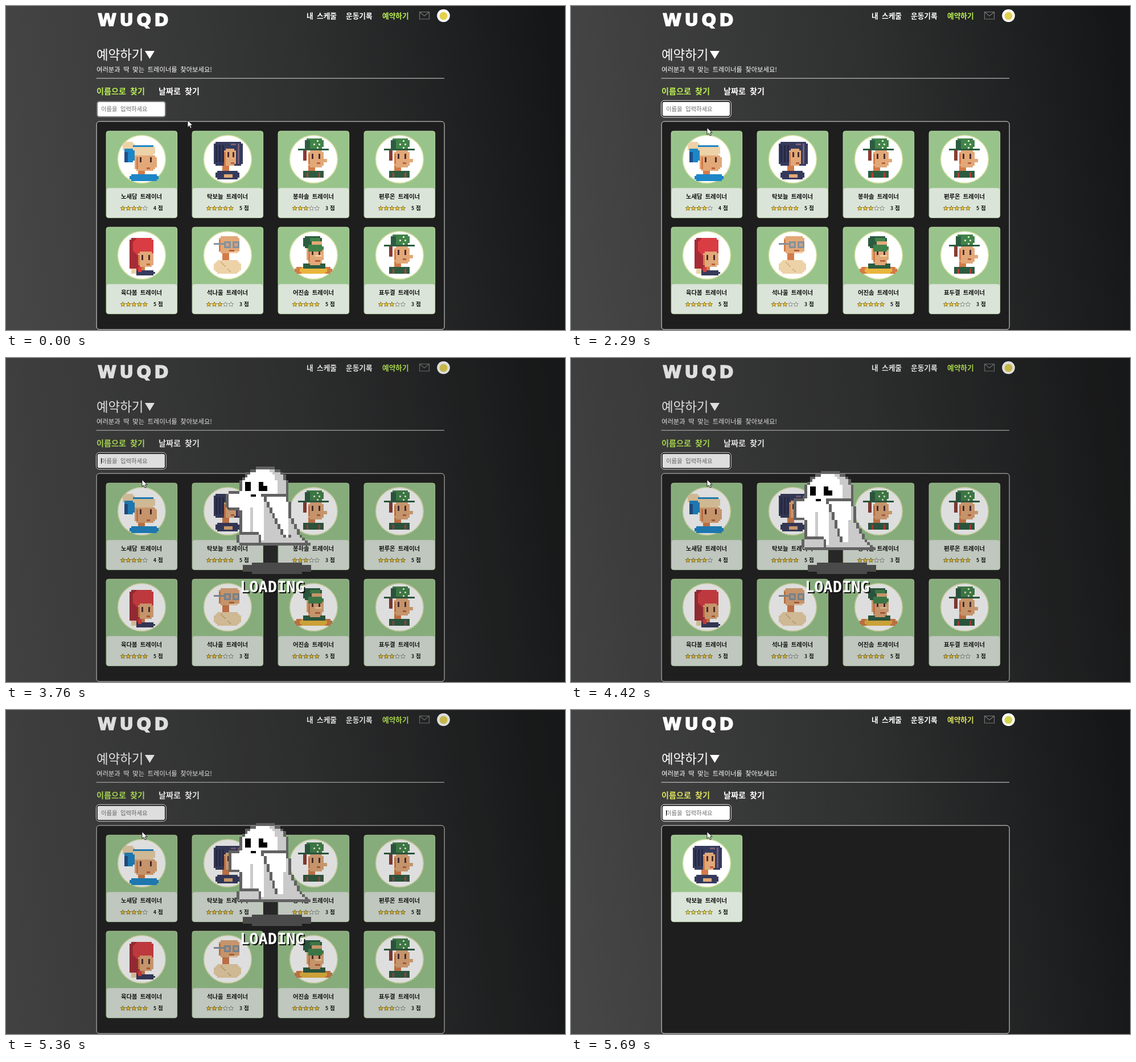
Animation of 982x570 px, one loop 5.9 s. Source, as an HTML page:

```html
<!DOCTYPE html>
<html lang="ko">
<head>
<meta charset="utf-8">
<title>예약하기</title>
<style>
html, body { margin: 0; width: 100%; height: 100%; overflow: hidden; background: #222; }
#stage {
  position: relative; width: 982px; height: 570px; overflow: hidden;
  background: linear-gradient(82deg, #464646 2%, #404040 16%, #2e2f2f 56%, #151617 97%);
}
svg { position: absolute; inset: 0; display: block; }
text { font-family: "Noto Sans CJK KR", "Noto Sans CJK", "Noto Sans", sans-serif; word-spacing: .22em; white-space: pre; }
.logo { font-family: "DejaVu Sans", sans-serif; letter-spacing: 5.5px; }
.mono { font-family: "DejaVu Sans Mono", monospace; }
.crisp { shape-rendering: crispEdges; }
.acc { fill: var(--acc); }
</style>
</head>
<body>
<div id="stage"></div>
<script>
const LOOP = 5900, FOCUS = 690, TYPE = 2820, LOAD = 3760, DONE = 5560;
const KEY = 87, BLINK = 465, BOB = 219, MOVE = 70;
const NAME = '탁보늘', JAMO = NAME.normalize('NFD');

const clamp = (v, a, b) => Math.min(b, Math.max(a, v));
const mix = (a, b, p) => a + (b - a) * p;

const rect = (x, y, w, h, fill, rest = '') =>
  `<rect x="${x}" y="${y}" width="${w}" height="${h}" fill="${fill}" ${rest}/>`;
const path = (d, fill, rest = '') => `<path d="${d}" fill="${fill}" ${rest}/>`;
const block = (x, y, w, h) => `M${x.toFixed(1)} ${y.toFixed(1)}h${w.toFixed(1)}v${h}h${(-w).toFixed(1)}z`;

// Text placed by its left edge and vertical middle.
const label = (s, x, mid, size, fill = '#fff', weight = 400, rest = '') =>
  `<text x="${x}" y="${mid + size * .36}" font-size="${size}" fill="${fill}" font-weight="${weight}" ${rest}>${s}</text>`;

// A rounded block drawn in square cells.
function blob(fill, cx, cy, rx, ry = rx, round = 4, u = 3) {
  const snap = v => Math.round(v / u) * u;
  const top = snap(cy - ry), rows = Math.max(1, (snap(cy + ry) - top) / u);
  let d = '';
  for (let i = 0; i < rows; i++) {
    const dy = Math.abs((2 * i + 1) / rows - 1);
    const half = rx * (1 - dy ** round) ** (1 / round), x = snap(cx - half);
    d += block(x, top + i * u, Math.max(u, snap(cx + half) - x), u);
  }
  return path(d, fill);
}

const SKIN = '#e2a878', TAN = '#d37b48', CREAM = '#edd2a8', NAVY = '#353a5c', DARK = '#4a2c30';
const GREEN = '#41834a', PINE = '#2c5c40', BLUE = '#1d86c6', RED = '#d93d43', STEEL = '#85929b';

function bust(cx, cy, rx, ry, shirt) {
  const eye = side => blob(DARK, cx + 1 + side * rx * .45, cy - 4, 1.5, 4.5);
  return blob(TAN, cx - 6, cy + ry + 4, 6, 8) + shirt
    + blob(SKIN, cx, cy, rx, ry) + blob(TAN, cx - rx + 3, cy, 1.5, ry * .7)
    + eye(-1) + eye(1) + blob('#b9603c', cx + 5, cy + ry * .6, 4, 1.5);
}

const repeat = (n, fn) => Array.from({ length: n }, (_, i) => fn(i)).join('');

const faces = {
  phones: blob(CREAM, 20, 21, 10, 9)
    + bust(49, 48, 19, 15, blob(BLUE, 46, 74, 25, 6))
    + blob(CREAM, 46, 27, 21, 8) + blob(BLUE, 45, 20, 18, 2) + blob(BLUE, 20, 36, 9, 12) + blob('#1d4f8c', 15, 38, 4, 9),
  bob: blob(NAVY, 43, 32, 25, 21, 8)
    + bust(46, 39, 11, 15, blob(NAVY, 41, 70, 21, 8) + blob(SKIN, 44, 72, 8, 3))
    + blob(NAVY, 44, 17, 18, 6) + repeat(3, i => blob('#252944', 22 + i * 6, 33, 1.5, 16))
    + blob('#786078', 62, 34, 2, 18) + blob('#786078', 53, 17, 5, 2),
  cap: bust(46, 42, 14, 14, blob(PINE, 42, 70, 19, 6) + repeat(2, i => blob('#b83c38', 32 + i * 20, 71, 2, 5)))
    + blob(SKIN, 59, 45, 6, 3) + blob('#8b3b32', 27, 36, 3, 8)
    + blob(GREEN, 43, 16, 17, 9) + blob(PINE, 31, 17, 5, 8) + blob(PINE, 42, 26, 28, 2)
    + repeat(4, i => blob('#d8e4c4', 48 + 5 * Math.cos(i * Math.PI / 2), 16.5 + 5 * Math.sin(i * Math.PI / 2), 1.5)),
  hood: blob('#a52c36', 30, 40, 10, 29) + blob(RED, 46, 27, 18, 16)
    + bust(49, 50, 14, 13, blob(NAVY, 48, 73, 17, 5) + blob(CREAM, 28, 71, 5)) + blob(RED, 39, 67, 3, 5),
  glasses: bust(45, 25, 19, 15, blob(CREAM, 42, 63, 23, 12) + repeat(5, i => blob('#d7b588', 30 + i * 4, 54 + i * 4, 1.5)))
    + blob(STEEL, 29, 22, 11, 1.5)
    + repeat(2, i => blob(STEEL, 42 + i * 14, 25, 6, 6, 9) + blob('#c5a28b', 42 + i * 14, 25, 3, 3, 9)) + blob('#f3cda2', 52, 36, 8, 1.5),
  bandana: bust(45, 40, 14, 21, blob(TAN, 42, 69, 32, 6) + blob('#e9b63c', 42, 70, 23, 6) + blob(PINE, 43, 61, 20, 4))
    + blob(PINE, 41, 20, 16, 10) + blob(GREEN, 45, 14, 10, 3) + blob(SKIN, 48, 21, 9, 2)
    + blob(GREEN, 46, 30, 13, 6) + blob('#f3cda2', 50, 43, 6, 1.5)
};

function star(cx, cy, on) {
  const pts = Array.from({ length: 10 }, (_, i) => {
    const r = i % 2 ? 1.9 : 4.5, a = i * Math.PI / 5;
    return (cx + r * Math.sin(a)).toFixed(1) + ',' + (cy - r * Math.cos(a)).toFixed(1);
  });
  return `<polygon points="${pts.join(' ')}" fill="${on ? 'var(--star)' : '#e9eee7'}" stroke="${on ? '#71601f' : '#747c74'}" stroke-width=".8"/>`;
}

function card([name, score, face], i) {
  const x = 176 + i % 4 * 151, y = 220 + Math.floor(i / 4) * 169;
  const s = rect(.1, .1, 124.5, 152.5, '#98c48b', 'rx="4" stroke="#bfdca6"')
    + rect(.6, 100.2, 123.5, 52, '#dbe4d9', 'rx="4"')
    + '<circle cx="62.4" cy="49.5" r="42" fill="#fff" stroke="#d3e0a1" stroke-width="1.6"/>'
    + `<g class="crisp" transform="translate(20 7)">${faces[face]}</g>`
    + label(name + ' 트레이너', 62, 115, 10.4, '#111', 800, 'text-anchor="middle"')
    + repeat(5, k => star(29.3 + k * 9.75, 136, k < score))
    + label(score, 83, 135.5, 8.5, '#111', 800) + label('점', 91, 135.5, 9.5, '#111', 800);
  return `<g transform="translate(${x} ${y})">${s}</g>`;
}

// The ghost is coloured cell by cell; its sleeve and arm swing between two poses.
function ghost(down) {
  const u = 4.8, left = 386, top = 191, floor = 331;
  const oval = (x, y, cx, cy, rx, ry) => ((x - cx) / rx) ** 4 + ((y - cy) / ry) ** 4 < 1;
  const edge = (inside, x, y) => !(inside(x - u, y) && inside(x + u, y) && inside(x, y - u) && inside(x, y + u));
  const side = y => {
    const v = (y - top) / (floor - top), dome = Math.sqrt(1 - (1 - Math.min(v * 4, 1)) ** 2);
    return [455 - 44 * dome, 455 + 42 * dome + 40 * v ** 4];
  };
  const body = (x, y) => {
    if (y < top || y > floor) return false;
    const [l, r] = side(y);
    return x > l && x < r && (x > 430 || y < 326);
  };
  const arm = (x, y) => oval(x, y, mix(402, 405, down), mix(251, 257, down), 16, mix(15, 20, down));
  const foot = (x, y) => oval(x, y, 427, 318, 21, 11);
  const solid = (x, y) => body(x, y) || arm(x, y) || foot(x, y);
  const sleeve = (x, y) => {
    const p = (y - 240) / 74;
    return p > 0 && p < 1 && Math.abs(x - 471 - mix(22, 8, down) * p) < 23 - 17 * p;
  };

  function tone(x, y) {
    if (!solid(x, y)) return null;
    if (edge(solid, x, y)) return '#626262';
    if (foot(x, y)) return edge(foot, x, y) ? '#626262' : '#cacaca';
    if (sleeve(x, y)) return sleeve(x - u, y) && sleeve(x, y - u) ? '#fff' : '#626262';
    if (y < 242) return x < side(y)[1] - 20 ? '#fff' : '#cacaca';
    const fold = y > 262 && Math.abs(x - 430) < 3;
    return x < 452 && y < 321 && !fold ? '#fff' : '#cacaca';
  }

  const layers = {};
  for (let y = top; y < floor; y += u)
    for (let x = left; x < 540; x += u) {
      const c = tone(x + u / 2, y + u / 2);
      if (c) layers[c] = (layers[c] || '') + block(x, y, u, u);
    }
  return Object.entries(layers).map(([c, d]) => path(d, c)).join('')
    + rect(420, 218, 10, 16, '#000') + rect(444, 218, 8, 16, '#000')
    + rect(451, 225, 8, 9, '#000') + rect(430, 240, 9, 4, '#000');
}

const people = [
  ['노새담', 4, 'phones'], [NAME, 5, 'bob'], ['봉하솔', 3, 'cap'], ['편루온', 5, 'cap'],
  ['육다봄', 5, 'hood'], ['석나울', 3, 'glasses'], ['어진솜', 5, 'bandana'], ['표두결', 3, 'cap']
];

const header =
  label('WUQD', 161, 24, 30, '#fff', 700, 'class="logo" stroke="#fff" stroke-width="1.6"')
  + label('내 스케줄', 528, 17.5, 12.7, '#fff', 700)
  + label('운동기록', 597, 17.5, 12.7, '#fff', 700)
  + label('예약하기', 661, 17.5, 12.7, '', 700, 'class="acc"')
  + path('M726.5 10.5h17v12.5h-17zl8.5 7 8.5-7', 'none', 'stroke="#777" stroke-width="1.2"')
  + '<circle cx="768.5" cy="17" r="11.3" fill="#fff"/><circle cx="768.5" cy="17.5" r="7" fill="var(--bird)"/>';

const page = header
  + label('예약하기', 159, 86, 22.4, '#fff', 500)
  + path('M244 79h17l-8.5 14z', '#fff')
  + label('여러분과 딱 맞는 트레이너를 찾아보세요!', 159, 112, 11.3, '#fff', 500)
  + rect(158.5, 126.7, 611.5, 1, '#d8d8d8')
  + label('이름으로 찾기', 159, 150, 14.1, '', 600, 'class="acc"')
  + label('날짜로 찾기', 268, 150, 14.1, '#fff', 600)
  + '<g id="blur">' + rect(160, 168, 120, 27, '#fff', 'rx="4" stroke="#767676" stroke-width="2"') + '</g>'
  + '<g id="focus">' + rect(158.5, 166.3, 122.7, 29.5, '#101010', 'rx="5.5" stroke="#fff"')
  + rect(160.7, 168.7, 118.3, 24.7, '#fff', 'rx="3"') + '</g>'
  + label('이름을 입력하세요', 167, 181, 10.4, '#6c6c6c', 400, 'id="hint"')
  + label('', 167, 181, 10.4, '#111', 400, 'id="typed"')
  + rect(0, 176, 1, 10, '#000', 'id="caret"')
  + rect(159.1, 203.1, 611, 366, '#1e1e1e', 'rx="5" stroke="#e2e2e2"')
  + `<g id="all">${people.map(card).join('')}</g>`
  + `<g id="found">${card(people[1], 0)}</g>`;

const word = (shift, fill) => label('LOADING', 411 + shift, 402.5 + shift, 27, fill, 700, 'class="mono"');
const loading = rect(0, 0, 982, 570, '#222', 'opacity=".15"')
  + '<g class="crisp">' + rect(452, 326, 25, 34, '#272727')
  + blob('#4a4a4a', 475.5, 369.5, 61, 11.5, 2.6, 4)
  + `<g id="up">${ghost(0)}</g><g id="down" transform="translate(0 8)">${ghost(1)}</g></g>`
  + word(2, '#111') + word(0, '#fff');

const stage = document.getElementById('stage');
stage.innerHTML =
  `<svg width="982" height="570" viewBox="0 0 982 570">${page}<g id="loading">${loading}</g>`
  + `<g id="cursor"><g id="arrow">${path('M0 0v12.5l3-2.8 2 4.6 2.2-1-2-4.4h4z', '#fff', 'stroke="#111" stroke-width=".9"')}</g>`
  + `<g id="beam">${path('M-3-8h2l1 1 1-1h2M0-7V7M-3 8h2l1-1 1 1h2', 'none', 'stroke="#111"')}</g></g></svg>`;

const ui = {};
for (const el of stage.querySelectorAll('[id]')) ui[el.id] = el;
const show = (el, on) => { el.style.display = on ? '' : 'none'; };

// Progress from 0 to 1 in n hard steps.
const stepped = (t, n) => Math.floor(clamp(t / MOVE, 0, n)) / n;
const flips = (t, span) => Math.floor(Math.max(0, t) / span) % 2;

function pointer(t) {
  const a = stepped(t, 6), b = stepped(t - 1020, 2);
  const p = a * a * (3 - 2 * a);
  return [mix(mix(319, 231, p), 239, b), mix(mix(201, 178.5, p), 214, b)];
}

function draw(t) {
  const focused = t >= FOCUS, done = t >= DONE, busy = t >= LOAD && !done;
  const keys = t < LOAD ? clamp(Math.floor((t - TYPE) / KEY) + 1, 0, JAMO.length) : 0;
  const text = JAMO.slice(0, keys).normalize('NFC');
  const [x, y] = pointer(t), inField = x < 281 && y < 196;

  show(ui.blur, !focused);
  show(ui.focus, focused);
  show(ui.hint, !text);
  if (ui.typed.textContent !== text) ui.typed.textContent = text;
  show(ui.caret, focused && !flips(t - (t < TYPE ? 890 : LOAD), BLINK));
  ui.caret.setAttribute('x', 167 + Math.round(text.length * 9.6));

  show(ui.all, !done);
  show(ui.found, done);
  show(ui.loading, busy);
  const down = flips(t - LOAD, BOB);
  show(ui.up, !down);
  show(ui.down, down);

  ui.cursor.setAttribute('transform', `translate(${x} ${y})`);
  show(ui.arrow, !inField);
  show(ui.beam, inField);

  stage.style.setProperty('--acc', done ? '#dce35c' : '#b9f052');
  stage.style.setProperty('--star', done ? '#dfdc50' : '#f4c92e');
  stage.style.setProperty('--bird', done ? '#d3d64e' : '#e3d150');
}

const begin = performance.now();
function tick() {
  draw((performance.now() - begin) % LOOP);
  requestAnimationFrame(tick);
}
tick();
</script>
</body>
</html>
```
